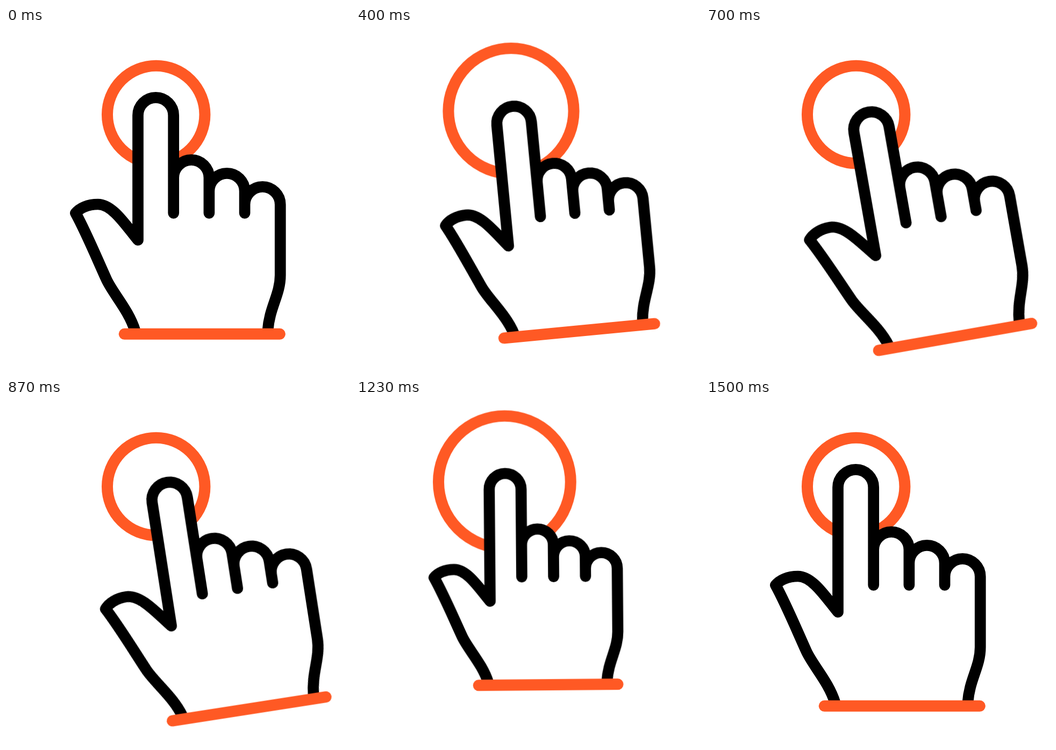
Recreate the animation shown at these times as an HTML page without scripts. Size 640 by 640 pixels, loop 1670 ms.

```html
<!DOCTYPE html>
<html lang="en">
<head>
<meta charset="utf-8">
<title>Double tap</title>
<style>
  html, body { margin: 0; width: 100%; height: 100%; overflow: hidden; background: #fff; }
  svg { display: block; width: 100vw; height: 100vh; }
  path, circle {
    fill: none;
    stroke-width: 20.7;
    stroke-linecap: round;
    stroke-linejoin: round;
    vector-effect: non-scaling-stroke;
  }
  .outline { stroke: #000; fill: #fff; }
  .accent { stroke: #ff5924; stroke-width: 21; }

  .ring, .tilt, .press {
    --smooth: cubic-bezier(.333, 0, .667, 1);
    animation: 1670ms var(--smooth) infinite;
  }
  .ring { transform-origin: 279.2px 161px; animation-name: ring; }
  .tilt, .press { transform-origin: 254px 187px; }
  .tilt { animation-name: tilt; }
  .press { animation-name: press; }

  @keyframes ring {
    0%, 14%, 42%, 60%, 88.6%, 100% { transform: translate(0, 0) scale(1); }
    28% { transform: translate(11.6px, -8.2px) scale(1.355); }
    74% { transform: translate(-2.8px, -8.5px) scale(1.355); }
  }
  @keyframes tilt {
    0%, 7%, 80%, 100% { transform: translate(0, 0) rotate(0deg); }
    39% { transform: translate(34px, 30.5px) rotate(-10deg); }
    45% {
      transform: translate(34px, 30.5px) rotate(-10deg);
      animation-timing-function: cubic-bezier(.36, 0, .5, 1);
    }
  }
  @keyframes press {
    0%, 4.8%, 27%, 58.5%, 80.7%, 100% { transform: scale(1); }
    16%, 69.7% { transform: scale(.85); }
  }
</style>
</head>
<body>
<svg viewBox="0 0 640 640">
  <circle class="ring accent" cx="279.2" cy="161" r="90.75"/>
  <g class="tilt">
    <g class="press">
      <path class="outline" d="
        M240 563 C229 526 199 494 187 468 C168 426 148 378 129.5 344.5
        C137 335 152 328 171 328 C198 328 222 366 245.5 394.5
        V162.5 a33.1 33.1 0 0 1 66.2 0
        V278.5 a33.1 33.1 0 0 1 66.2 0
        V303.5 a33.1 33.1 0 0 1 66.2 0
        V328.5 a33.1 33.1 0 0 1 66.2 0
        V460 C510.3 496 490 520 487 563
        M311.7 278 V344.5 M377.9 303 V344.5 M444.1 328 V344.5"/>
      <path class="accent" d="M220.2 569.3 H509.4"/>
    </g>
  </g>
</svg>
</body>
</html>
```
